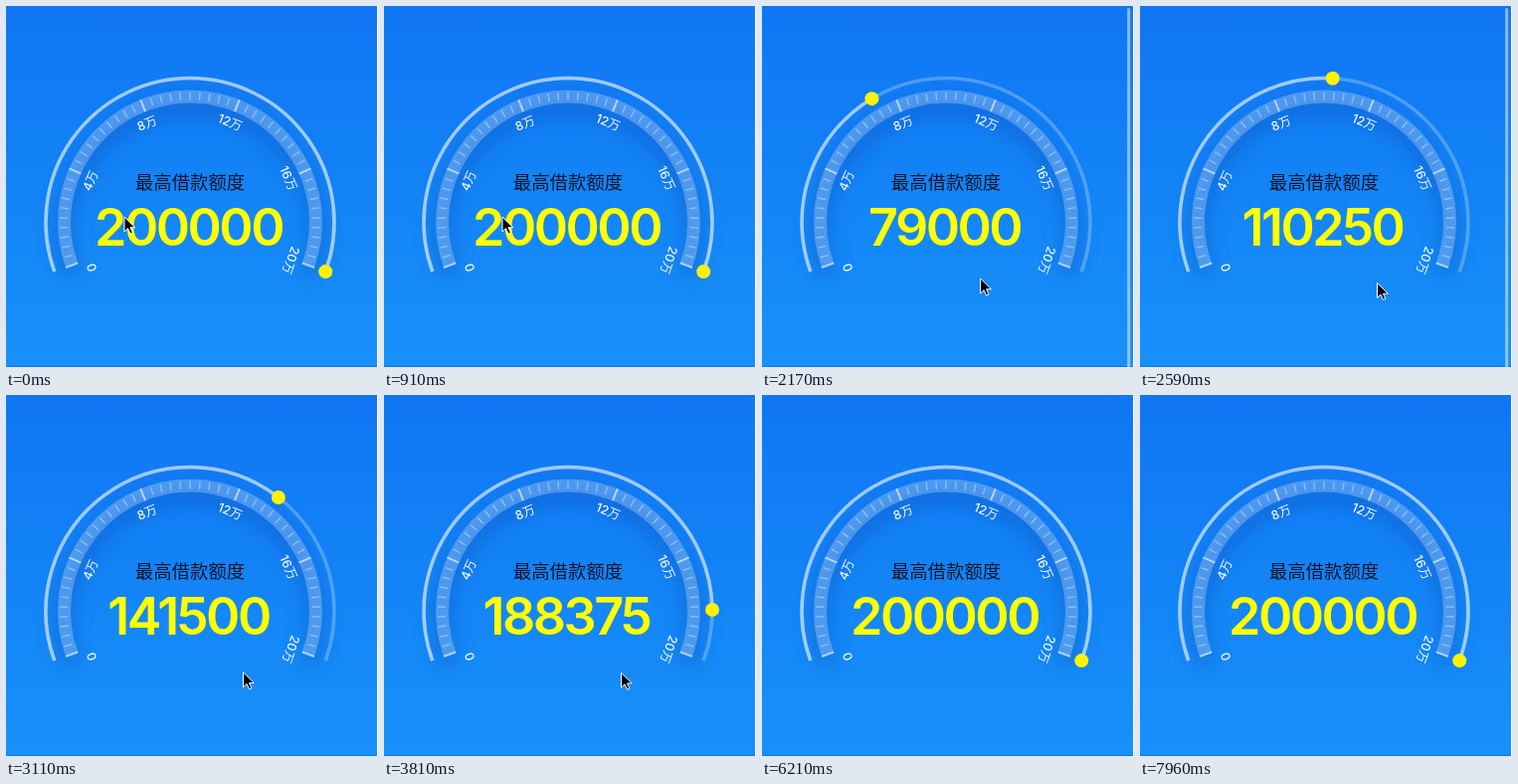
Animation of 374 by 363 pixels, one loop 8260 ms. Source, as an HTML page:

```html
<!DOCTYPE html>
<html lang="zh">
<head>
<meta charset="utf-8">
<style>
  html, body { margin: 0; width: 100%; height: 100%; overflow: hidden; background: #1284f7; }
  svg { display: block; width: 374px; height: 363px; }
  text { font-family: Inter, "Noto Sans CJK SC", "Noto Sans CJK", sans-serif; }
  .label { font-size: 12.5px; font-weight: 500; fill: #fff; fill-opacity: .95; }
  .title { font-size: 18.4px; font-weight: 500; fill: #08172d; text-anchor: middle; }
  .amount { font-size: 52px; font-weight: 600; letter-spacing: -2.5px; fill: #ff0; text-anchor: middle; }
  .shadow { filter: blur(10px); }
</style>
</head>
<body>
<svg viewBox="0 0 374 363">
  <defs>
    <linearGradient id="sky" x1="0" y1="0" x2="0" y2="1">
      <stop offset="0" stop-color="#1076f4"/>
      <stop offset="1" stop-color="#1791f9"/>
    </linearGradient>
  </defs>
  <rect width="374" height="363" fill="url(#sky)"/>
  <rect y="362" width="374" height="1" fill="#0b5fb8" opacity=".5"/>
  <rect x="373" width="1" height="363" fill="#fff"/>
  <g id="dial" fill="none" stroke="#fff"></g>
  <text class="title" x="185" y="184">最高借款额度</text>
  <text class="amount" id="amount" x="183.5" y="241.2"></text>
  <circle id="dot" r="7" fill="#fff200"/>
  <rect id="scrollbar" x="367.2" y="2" width="3" height="365" rx="1.5" fill="#fff" fill-opacity=".5"/>
  <path id="cursor" d="M0 0V15L3.5 11.6L6 17L8.4 16L6 10.7H10.8Z" fill="#000" stroke="#fff" stroke-width="1" stroke-linejoin="round"/>
</svg>
<script>
const LOOP = 8260, CX = 185, CY = 217.5, SWEEP = 220, MAX = 200000;
const RELOAD = 990, TRACK_R = 145, BAND_R = 126.5;
const $ = id => document.getElementById(id);
const clamp = (v, lo, hi) => Math.min(hi, Math.max(lo, v));

function add(tag, attrs, text = '') {
  const el = document.createElementNS('http://www.w3.org/2000/svg', tag);
  for (const key in attrs) el.setAttribute(key, attrs[key]);
  el.textContent = text;
  return $('dial').appendChild(el);
}

// Degrees run along the dial from its lower left end.
function polar(deg, r) {
  const a = (160 + deg) * Math.PI / 180;
  return [CX + r * Math.cos(a), CY + r * Math.sin(a)];
}

function arc(deg, r) {
  return `M${polar(0, r)}A${r} ${r} 0 ${deg > 180 ? 1 : 0} 1 ${polar(deg, r)}`;
}

add('path', {
  class: 'shadow', d: arc(SWEEP, BAND_R), transform: 'translate(0 10)',
  stroke: '#0a4cb8', 'stroke-width': 14, 'stroke-opacity': .5
});
add('path', { d: arc(SWEEP, TRACK_R), 'stroke-width': 3.5, 'stroke-opacity': .25 });
const progress = add('path', { 'stroke-width': 3.5, 'stroke-opacity': .46 });
add('path', { d: arc(SWEEP, BAND_R), 'stroke-width': 13, 'stroke-opacity': .25 });

for (let i = 0; i <= 50; i++) {
  const deg = i * SWEEP / 50, major = i % 10 === 0;
  const [inner, outer] = major ? [120, 133] : [123, 131];
  add('path', {
    d: `M${polar(deg, inner)}L${polar(deg, outer)}`,
    'stroke-width': major ? 2 : 1.4,
    'stroke-opacity': major ? .6 : .36
  });
  if (major) {
    add('text', {
      class: 'label', x: -13, stroke: 'none',
      transform: `translate(${polar(deg, 104)}) rotate(${deg - 110})`
    }, i ? i / 10 * 4 + '万' : '0');
  }
}

// Playback cadence: two short ticks and a long one every 140 ms,
// with a brief stutter midway.
function tickAt(t) {
  const s = t - 30, cycle = Math.floor(s / 140);
  const n = cycle * 3 + Math.min(2, Math.floor((s - cycle * 140) / 20));
  return n >= 44 && n <= 51 ? n - 1 : n;
}

const linear = k => k, easeIn = k => k * k, easeOut = k => k * (2 - k);

// Each stop: arrival time, x, y and the easing of the way there.
const cursorPath = [
  [0, 119, 212, linear], [1020, 119, 212, linear], [1470, 138.5, 231, easeIn],
  [2170, 219.5, 274, linear], [2600, 238.5, 278.5, easeOut],
  [4250, 238.5, 279.5, linear], [4480, 375, 270, easeIn]
];

function cursorAt(t) {
  const i = cursorPath.findIndex(p => p[0] > t);
  if (i < 0) return null;
  const [t0, x0, y0] = cursorPath[i - 1], [t1, x1, y1, ease] = cursorPath[i];
  const k = ease((t - t0) / (t1 - t0));
  return [x0 + (x1 - x0) * k, y0 + (y1 - y0) * k];
}

function draw(t) {
  const n = tickAt(t), idle = t < RELOAD;
  const value = idle ? MAX : clamp(875 + 3125 * (n - 21), 0, MAX);
  const deg = idle ? SWEEP : clamp(SWEEP / 64 * (n - 23), 0, SWEEP);

  $('amount').textContent = value;
  progress.setAttribute('d', deg > 0 ? arc(deg, TRACK_R) : '');
  $('dot').setAttribute('transform', `translate(${polar(deg, TRACK_R)})`);
  $('scrollbar').setAttribute('opacity', idle ? 0 : clamp((2950 - t) / 250, 0, 1));

  const pos = cursorAt(t);
  $('cursor').setAttribute('visibility', pos ? 'visible' : 'hidden');
  if (pos) $('cursor').setAttribute('transform', `translate(${pos})`);
}

const start = performance.now();
function loop() {
  draw((performance.now() - start) % LOOP);
  requestAnimationFrame(loop);
}
loop();
</script>
</body>
</html>
```
